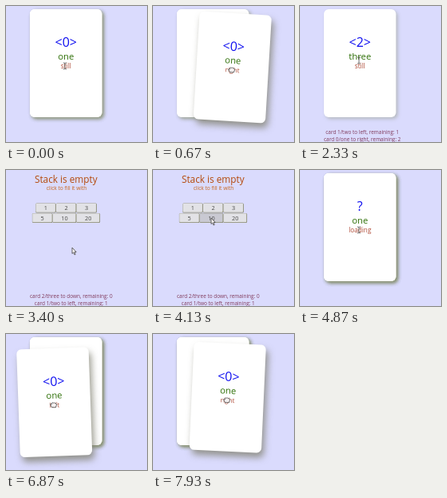
Animation, 177 px wide and 170 px high, one loop 8 s. Source, as an HTML page with a canvas:

```html
<!DOCTYPE html>
<html lang="en">
<head>
<meta charset="utf-8">
<title>Card stack</title>
<style>
  html, body { margin: 0; width: 100%; height: 100%; overflow: hidden; background: #dadbfd; }
  canvas { display: block; width: 177px; height: 170px; }
</style>
</head>
<body>
<canvas id="stage"></canvas>
<script>
const W = 177, H = 170, LOOP = 8000;
const CARD = { x: 30, y: 4, w: 90.5, h: 135, r: 6 };
const CENTER = { x: CARD.x + CARD.w / 2, y: CARD.y + CARD.h / 2 };
const NAMES = ['one', 'two', 'three'];
const FONT = '"Open Sans", "Noto Sans", sans-serif';

const DRAG = 400, FLY = 200, GLIDE = 300;
const FILL_AT = 4200, LOADED_AT = 5050, WANDER_AT = 5500;

const canvas = document.getElementById('stage');
const ctx = canvas.getContext('2d');
const scale = window.devicePixelRatio || 1;
canvas.width = W * scale;
canvas.height = H * scale;

const swipes = [[1, 0.2], [-1, 0.13], [0, 1]].map(([x, y], i) => ({ x, y, grab: 380 + i * 1075 }));

// Where the pointer rests between drags
const stops = [
  { at: 0, x: 74, y: 75 },
  { at: 1330, x: 92, y: 74 },
  { at: 2330, x: 74, y: 68 },
  { at: 3350, x: 83, y: 97 },
  { at: 4000, x: 73, y: 60 },
  { at: 4700, x: 74, y: 75 },
];

function ease(u) {
  const c = Math.min(1, Math.max(0, u));
  return c * c * (3 - 2 * c);
}

function dragOffset(swipe, t) {
  const reach = 30 * ease((t - swipe.grab) / DRAG);
  return { x: swipe.x * reach, y: swipe.y * reach };
}

function swipeOffset(swipe, t) {
  const { x, y } = dragOffset(swipe, t);
  const fly = 140 * ease((t - swipe.grab - DRAG) / FLY);
  return { x: x + swipe.x * fly, y: y + swipe.y * fly };
}

// Circles from the top through left and bottom towards the right
function wanderOffset(t) {
  const since = t - WANDER_AT;
  const angle = (284 - 0.1075 * since) * Math.PI / 180;
  const radius = 20 * ease(since / 400);
  return { x: radius * Math.cos(angle), y: radius * Math.sin(angle) };
}

function cursorAt(t) {
  const i = stops.findLastIndex(stop => t >= stop.at - GLIDE);
  const to = stops[i], from = stops[i - 1] || to;
  const release = swipes[i - 1] ? dragOffset(swipes[i - 1], t) : { x: 0, y: 0 };
  const u = ease((t - to.at + GLIDE) / GLIDE);
  const own = swipes[i] ? dragOffset(swipes[i], t) : wanderOffset(t);
  const mix = axis => (from[axis] + release[axis]) * (1 - u) + to[axis] * u + own[axis];
  return { x: mix('x'), y: mix('y') };
}

function direction({ x, y }) {
  if (Math.hypot(x, y) < 2) return 'still';
  if (Math.abs(x) > Math.abs(y)) return x < 0 ? 'left' : 'right';
  return y < 0 ? 'up' : 'down';
}

function text(str, x, y, size, color) {
  ctx.font = `${size}px ${FONT}`;
  ctx.textAlign = 'center';
  ctx.fillStyle = color;
  ctx.fillText(str, x, y);
}

function box(x, y, w, h, r, color) {
  ctx.fillStyle = color;
  ctx.beginPath();
  ctx.roundRect(x, y, w, h, r);
  ctx.fill();
}

function drawCard(shadow, blur, dx, dy) {
  ctx.save();
  ctx.shadowColor = shadow;
  ctx.shadowBlur = blur * scale;
  ctx.shadowOffsetX = dx * scale;
  ctx.shadowOffsetY = dy * scale;
  box(CARD.x, CARD.y, CARD.w, CARD.h, CARD.r, '#fff');
  ctx.restore();
}

function cardText(index, state) {
  text(state === 'loading' ? '?' : `<${index}>`, 75.3, 51, 16, '#1010f0');
  text(NAMES[index], 75.3, 67, 11.3, '#2f7008');
  text(state, 75.3, 78, 8.2, '#b04c38');
}

function drawStack(index, count, offset, held, state) {
  const below = held ? count - 1 : count;
  for (let i = 0; i < Math.min(below, 4); i++) drawCard('rgba(115, 125, 80, 0.34)', 4.5, 2.3, 2.3);
  if (held && below) cardText(index + 1, 'still');

  ctx.save();
  ctx.translate(CENTER.x + offset.x, CENTER.y + offset.y);
  ctx.rotate(offset.x * 0.14 * Math.PI / 180);
  ctx.translate(-CENTER.x, -CENTER.y);
  if (held) drawCard('rgba(130, 130, 115, 0.8)', 9, 3, 6);
  cardText(index, state);
  ctx.restore();
}

function drawEmpty(t) {
  text('Stack is empty', 75.3, 16, 11.8, '#b5480a');
  text('click to fill it with', 76, 25, 6.6, '#c8661c');
  [['1', '2', '3'], ['5', '10', '20']].forEach((labels, row) => {
    const widths = labels.map(label => 21.4 + label.length * 4.2);
    let x = 75.5 - widths.reduce((a, b) => a + b) / 2;
    const y = 41.5 + row * 12.5;
    labels.forEach((label, i) => {
      const pressed = label === '10' && t > FILL_AT - 100;
      box(x, y, widths[i], 12, 1.5, '#85866a');
      box(x + 0.3, y + 0.3, widths[i] - 1.1, 10.9, 1, pressed ? '#c9c9d2' : '#e2e2e6');
      text(label, x + widths[i] / 2, y + 8.7, 7.3, '#4a4a4a');
      x += widths[i];
    });
  });
}

function drawMessages(t) {
  const lines = swipes
    .map((swipe, i) => `card ${i}/${NAMES[i]} to ${direction(swipeOffset(swipe, Infinity))}, remaining: ${2 - i}`)
    .filter((_, i) => t >= swipes[i].grab + DRAG + FLY)
    .reverse();
  ctx.font = `6.45px ${FONT}`;
  const width = Math.max(0, ...lines.map(line => ctx.measureText(line).width));
  lines.forEach((line, i) => text(line, 30 + width / 2, 159.6 + i * 9, 6.45, '#803a5c'));
}

const CURSORS = {
  text: 'M-2 -4Q0 -4 0 -3Q0 -4 2 -4M0 -3V3M-2 4Q0 4 0 3Q0 4 2 4',
  hand: 'M-4 -1L-2 -1L-2 -2.5Q-1 -3.5 0 -2.5Q1 -3.3 2 -2.3Q4 -2.5 4 0L3 3H-2Z',
  arrow: 'M0 0V7.5L1.7 6L3 9L4.2 8.4L3 5.5H5.2Z',
};

function drawCursor({ x, y }, kind) {
  const shape = new Path2D(CURSORS[kind]);
  ctx.save();
  ctx.translate(x, y);
  ctx.lineWidth = 0.8;
  ctx.strokeStyle = '#444';
  ctx.fillStyle = '#f4f0f0';
  if (kind !== 'text') ctx.fill(shape);
  ctx.stroke(shape);
  ctx.restore();
}

function draw(t) {
  ctx.setTransform(scale, 0, 0, scale, 0, 0);
  ctx.fillStyle = '#dadbfd';
  ctx.fillRect(0, 0, W, H);

  const filled = t >= FILL_AT;
  const index = filled ? 0 : swipes.findIndex(swipe => t < swipe.grab + DRAG + FLY);
  const empty = index < 0;
  const grab = filled ? WANDER_AT : empty ? Infinity : swipes[index].grab;
  const held = t >= grab;

  if (!filled) drawMessages(t);
  if (empty) {
    drawEmpty(t);
  } else {
    const offset = filled ? wanderOffset(t) : swipeOffset(swipes[index], t);
    const state = filled && t < LOADED_AT ? 'loading' : direction(offset);
    drawStack(index, filled ? 10 : 3 - index, offset, held, state);
  }

  const cursor = cursorAt(t);
  const dragging = held && (filled || t < grab + DRAG);
  const overText = !empty && !held && Math.abs(cursor.x - 75) < 14 && cursor.y > 35 && cursor.y < 80;
  drawCursor(cursor, dragging ? 'hand' : overText ? 'text' : 'arrow');
}

const start = performance.now();
function frame() {
  draw((performance.now() - start) % LOOP);
  requestAnimationFrame(frame);
}
frame();
</script>
</body>
</html>
```
